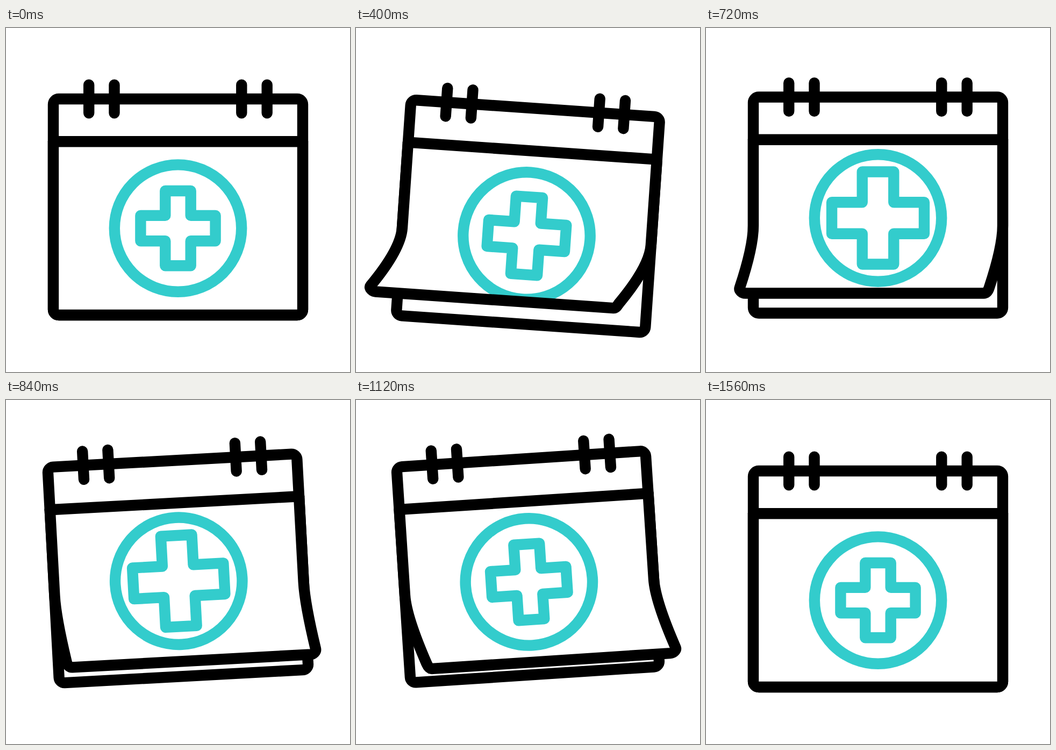
An HTML page for the animation above (1.6 s loop, 640 px wide and 640 px high).

```html
<!DOCTYPE html>
<html lang="en">
<head>
<meta charset="utf-8">
<title>Medical calendar</title>
<style>
  html, body { margin: 0; width: 100%; height: 100%; overflow: hidden; background: #fff; }
  svg { display: block; width: 100vw; height: 100vh; }
  .ink { fill: none; stroke: #000; }
  .teal { fill: none; stroke: #3cc; }
  .paper { fill: #fff; stroke: none; }
  g { stroke-width: 20.4; stroke-linecap: round; stroke-linejoin: round; }
</style>
</head>
<body>
<svg viewBox="0 0 640 640">
  <g id="calendar">
    <rect x="88" y="132" width="464" height="402" rx="10.2" fill="#fff" stroke="#000"/>
    <path id="paper" class="paper"/>
    <g id="badge">
      <circle class="teal" r="118.2"/>
      <path id="cross" class="teal"/>
    </g>
    <path id="page" class="ink"/>
    <path class="ink" d="M88 211.2H552M154.2 105.8V158.2M201.5 105.8V158.2M438.3 105.8V158.2M485.7 105.8V158.2"/>
  </g>
</svg>
<script>
const LOOP = 1600, STEP = 40;

// [time, value] keys, eased between neighbours
const tracks = {
  angle: [[40, 0], [440, 4], [1000, -4], [1520, 0]],
  lift:  [[40, 0], [440, 17.3], [1000, -24.3], [1520, 0]],
  curlX: [[80, 0], [480, -54], [1040, 33], [1560, 0]],
  curlY: [[80, 0], [480, -43.5], [1040, -24], [1560, 0]],
  badge: [[160, 0], [840, -16.2], [1520, 0]],
  scale: [[240, 1], [720, 1.235], [1220, 1]]
};

const $ = id => document.getElementById(id);
const calendar = $('calendar'), paper = $('paper'), page = $('page');
const badge = $('badge'), cross = $('cross');

// cubic-bezier(.6, 0, .4, 1)
function ease(u) {
  let lo = 0, hi = 1;
  for (let i = 0; i < 24; i++) {
    const s = (lo + hi) / 2, r = 1 - s;
    if (1.8 * s * r * r + 1.2 * s * s * r + s * s * s < u) lo = s; else hi = s;
  }
  return lo * lo * (3 - 2 * lo);
}

function valueAt(keys, t) {
  if (t <= keys[0][0]) return keys[0][1];
  for (let i = 1; i < keys.length; i++) {
    const [t0, a] = keys[i - 1], [t1, b] = keys[i];
    if (t < t1) return a + (b - a) * ease((t - t0) / (t1 - t0));
  }
  return keys[keys.length - 1][1];
}

// Front sheet: straight sides that bend towards the shifted bottom edge
function pagePath(dx, dy) {
  const R = 10.2, bend = 371, pull = 411;
  const endY = 534 - R + dy, bottom = 534 + dy;
  const len = Math.hypot(dx, endY - pull);
  const tx = dx / len * 5.6, ty = (endY - pull) / len * 5.6;
  const left = 88 + dx, right = 552 + dx;
  return `M88 211V${bend}Q88 ${pull} ${left} ${endY}` +
    `C${left + tx} ${endY + ty} ${left + 4.6} ${bottom} ${left + R} ${bottom}` +
    `H${right - R}` +
    `C${right - 4.6} ${bottom} ${right + tx} ${endY + ty} ${right} ${endY}` +
    `Q552 ${pull} 552 ${bend}V211`;
}

function crossPath(k) {
  const a = 69.6 * k, b = 23.7 * k;
  return `M${-b} ${-a}H${b}V${-b}H${a}V${b}H${b}V${a}H${-b}V${b}H${-a}V${-b}H${-b}Z`;
}

function draw(t) {
  const v = {};
  for (const name in tracks) v[name] = valueAt(tracks[name], t);
  calendar.setAttribute('transform', `translate(0 ${v.lift}) rotate(${v.angle} 320 333)`);
  const d = pagePath(v.curlX, v.curlY);
  paper.setAttribute('d', d);
  page.setAttribute('d', d);
  badge.setAttribute('transform', `translate(320 ${372.6 + v.badge})`);
  cross.setAttribute('d', crossPath(v.scale));
}

function tick() {
  const t = (performance.now() + 1) % LOOP;
  draw(Math.floor(t / STEP) * STEP);
  requestAnimationFrame(tick);
}
tick();
</script>
</body>
</html>
```
